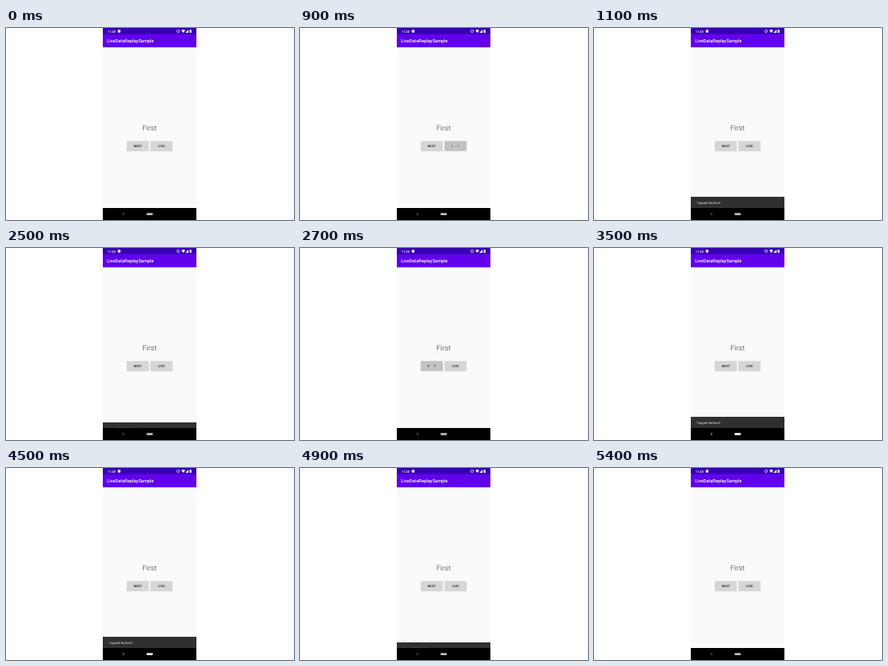
Recreate the animation shown at these times as an HTML page. Size 360x240 px, loop 5.5 s.

```html
<!DOCTYPE html>
<html lang="en">
<head>
<meta charset="utf-8">
<title>Snackbar demo</title>
<style>
  html, body { margin: 0; width: 100%; height: 100%; overflow: hidden; background: #fff; }
  svg { display: block; width: 100vw; height: 100vh; }
  text { font-family: Roboto, sans-serif; text-rendering: geometricPrecision; }
  .mid { text-anchor: middle; }
  .label { font-size: 4.1px; font-weight: 500; fill: #202020; }
  .big { font-size: 9px; fill: #6c6c6c; }
</style>
</head>
<body>
<svg viewBox="0 0 360 240">
  <defs>
    <clipPath id="screen"><rect x="121" width="117" height="240"/></clipPath>
    <linearGradient id="shade" x2="0" y2="1">
      <stop stop-color="#000" stop-opacity=".2"/>
      <stop offset="1" stop-color="#000" stop-opacity="0"/>
    </linearGradient>
  </defs>
  <rect width="360" height="240" fill="#fff"/>
  <g clip-path="url(#screen)">
    <rect x="121" width="117" height="240" fill="#fafafa"/>

    <g id="first">
      <text class="mid big" x="179.5" y="128.4">First</text>
      <rect id="next" x="150.8" y="141.3" width="27.8" height="12.2" rx=".7" fill="#d6d6d6"/>
      <rect id="live" x="180.5" y="141.3" width="27.8" height="12.2" rx=".7" fill="#d6d6d6"/>
      <path d="M151 153.7h27.4M180.7 153.7h27.4" stroke="#b4b4b4" stroke-width=".5"/>
      <text class="mid label" x="164.6" y="148.9">NEXT</text>
      <text class="mid label" x="194.3" y="148.9">LIVE</text>
    </g>
    <text id="second" class="mid big" x="179.5" y="128.4">Second</text>

    <g id="snack">
      <rect x="121" y="211" width="117" height="30" fill="#303030"/>
      <text id="message" x="128.5" y="219.9" font-size="4.1" letter-spacing=".06" fill="#e6e6e6">Tapped Button!!</text>
    </g>

    <rect x="121" y="24" width="117" height="1.4" fill="url(#shade)"/>
    <rect x="121" y="7" width="117" height="17" fill="#6200ee"/>
    <rect x="121" width="117" height="7.6" fill="#3700b3"/>
    <text x="126.2" y="18" font-size="5.7" font-weight="500" fill="#fff">LiveDataReplaySample</text>
    <g fill="#fff">
      <text x="126.7" y="5.5" font-size="4" font-weight="500">11:28</text>
      <circle cx="141.4" cy="4" r="1.9" fill-opacity=".9"/>
      <circle cx="215.2" cy="4" r="1.6" fill="none" stroke="#fff" stroke-width=".7"/>
      <path d="M219.2 3.1q2.4-2 4.8 0L221.6 6z"/>
      <path d="M228.2 2v4h-4z"/>
      <path d="M229.6 2.4h.6v-.5h1v.5h.6V6h-2.2z"/>
    </g>

    <rect x="121" y="225" width="117" height="15" fill="#000"/>
    <ellipse id="ripple" cx="147" cy="232.5" rx="9" ry="7.5" fill="#2b2b2b"/>
    <path id="back" d="M147.7 230.9L146.2 232.5L147.7 234.1" fill="none" stroke="#fff" stroke-width=".8"/>
    <rect id="pill" x="175.5" y="231.2" width="8.2" height="2.7" rx="1.35" fill="#fff"/>
    <circle id="touch" r="3.5" fill="#c8c8c8" fill-opacity=".9"/>
  </g>
</svg>
<script>
const LOOP = 5500, STEP = 100;
const $ = id => document.getElementById(id);
const set = (id, name, value) => $(id).setAttribute(name, value);
const show = (id, on) => set(id, "visibility", on ? "visible" : "hidden");
const within = (t, a, b) => t >= a && t < b;
const clamp = v => Math.max(0, Math.min(1, v));

// How far the snackbar is raised, from 0 to 1
function raised(t, start, leave) {
  if (t <= start || t >= leave + STEP) return 0;
  if (t >= leave) return .5;
  return t < start + 2 * STEP ? .75 : 1;
}

function touchPoint(t) {
  if (within(t, 900, 1000)) return [194.3, 148];
  if (within(t, 2700, 2800)) return [164.6, 148];
  if (within(t, 3300, 3400)) return [145.6, 238];
  return null;
}

function draw(ms) {
  const t = Math.floor(ms % LOOP / STEP) * STEP;
  const second = within(t, 2800, 3400);
  show("first", !second);
  show("second", second);

  const up = Math.max(raised(t, 900, 2500), raised(t, 3300, 4900));
  show("snack", up > 0);
  set("snack", "transform", `translate(0 ${14 * (1 - up)})`);
  set("message", "opacity", up < 1 ? up * .9 : 1);

  const point = touchPoint(t);
  show("touch", point);
  if (point) set("touch", "transform", `translate(${point})`);
  set("live", "fill", within(t, 900, 1000) ? "#c2c2c2" : "#d6d6d6");
  set("next", "fill", within(t, 2700, 2800) ? "#c2c2c2" : "#d6d6d6");

  set("ripple", "opacity", within(t, 3300, 3400) ? 1 : within(t, 3400, 3500) ? .5 : 0);
  const glow = t < 3400 ? 0 : t < 3500 ? .5 : clamp((4800 - t) / 400);
  set("pill", "opacity", .73 + .27 * glow);
  set("back", "opacity", .55 + .4 * glow);
}

function tick() {
  draw(performance.now());
  requestAnimationFrame(tick);
}
tick();
</script>
</body>
</html>
```
